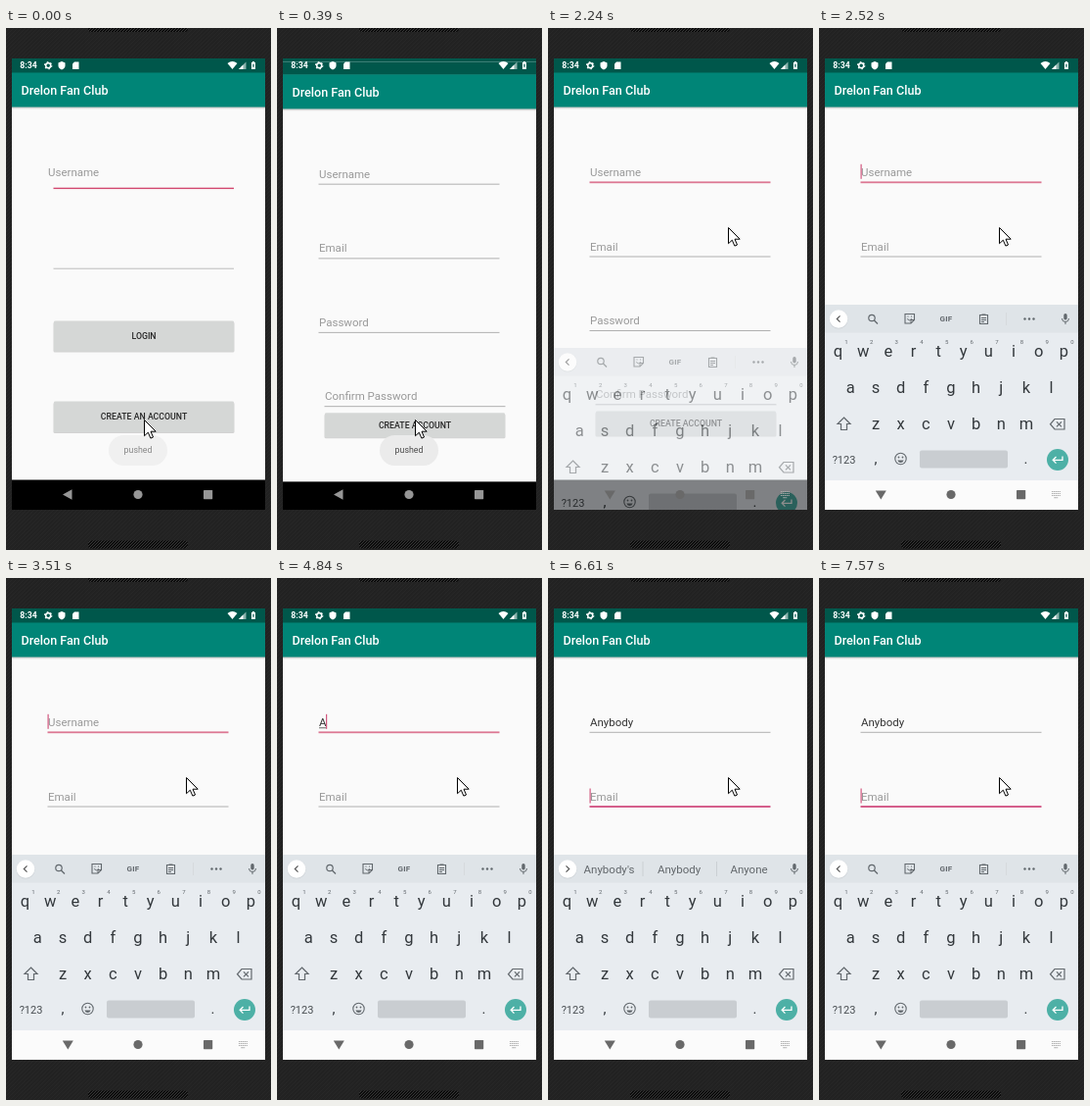
An HTML page for the animation above (8 s loop, 271 px wide and 532 px high).

```html
<!DOCTYPE html>
<html lang="en">
<head>
<meta charset="utf-8">
<title>Sign-up screen</title>
<style>
  html, body { margin: 0; width: 100%; height: 100%; overflow: hidden; background: #222; }
  svg { display: block; width: 100vw; height: 100vh; }
  text { font-family: Roboto, Arial, sans-serif; }
</style>
</head>
<body>
<svg id="stage" viewBox="0 0 271 532" xmlns="http://www.w3.org/2000/svg"></svg>
<script>
const LOOP = 8000;
const NAME = 'Anybody';
const stage = document.getElementById('stage');

// Screen recording: the picture is refreshed at these times and held between.
const ticks = [0, 150, 270, 390, 540, 690, 810, 960, 1120, 1260, 1540, 1690, 1820, 1970, 2090,
  2240, 2370, 2520, 2650, 3090, 3510, 4040, 4590, 4840, 4990, 5140, 5260, 5390, 5540, 5660,
  5780, 5930, 6180, 6610, 6890, 7010, 7570];
const caretFlips = [1540, 1970, 2520, 3090, 3510, 4040, 4590, 6180, 6610, 6890, 7570];
const keyTimes = [4840, 5140, 5260, 5390, 5540, 5660, 5780];
const suggestions = [
  [4990, 'A', 'All', 'And'],
  [5140, 'An', 'And', 'Any'],
  [5260, 'Any', 'Anyway', 'Anything'],
  [5390, 'Any', 'Anything', 'Anyone'],
  [5540, 'Any', 'Anything', 'Anybody'],
  [5930, "Anybody's", 'Anybody', 'Anyone']
];
const pointerPath = [[540, 141, 399], [690, 130, 320], [810, 122, 196], [960, 116, 175],
  [1120, 117, 157], [1260, 125, 153], [1540, 143, 185], [1690, 164, 196], [1820, 184, 203]];

const rect = (x, y, w, h, fill, more = '') =>
  `<rect x="${x}" y="${y}" width="${w}" height="${h}" fill="${fill}" ${more}/>`;
const text = (x, y, size, fill, str, more = '') =>
  `<text x="${x}" y="${y}" font-size="${size}" fill="${fill}" ${more}>${str}</text>`;
const mid = (x, y, size, fill, str, more = '') =>
  text(x, y, size, fill, str, 'text-anchor="middle" ' + more);
const path = (d, fill, more = '') => `<path d="${d}" fill="${fill}" ${more}/>`;
const line = (d, color, w = 1.1) => path(d, 'none', `stroke="${color}" stroke-width="${w}"`);
const group = (id, inner, more = '') => `<g id="${id}" ${more}>${inner}</g>`;

function windowFrame(inner) {
  return rect(6, 31, 259, 480, '#fafafa') +
    rect(6, 80, 259, 3, 'url(#shade)') +
    rect(6, 31, 259, 15, '#00574b') +
    rect(6, 45.5, 259, 35, '#008577') +
    text(15.5, 68, 12.6, '#fff', 'Drelon Fan Club', 'font-weight="500"') +
    inner + rect(6, 460.5, 259, 60, '#000');
}

function button(y, h, label) {
  return rect(48.5, y + 1, 185, h, '#000', 'rx="1.5" opacity=".16"') +
    rect(49, y, 184, h, '#d5d7d6', 'rx="1.2"') +
    mid(141, y + h / 2 + 3.1, 8.75, '#262626', label, 'font-weight="500"');
}

function field(id, x, y, hint) {
  return text(x, y, 11.5, '#999', hint, `id="${id}Hint"`) +
    rect(x - .5, y + 6, 185, 1, '#b1b1b1', `id="${id}Line"`);
}

function keyboard() {
  const ink = '#33383c', soft = '#62686d';
  const row = (keys, x0, y) => [...keys].map((k, i) => mid(x0 + i * 25.65, y, 16.5, ink, k)).join('');
  const digits = [...'1234567890'].map((k, i) => mid(28 + i * 25.65, 322, 6, soft, k)).join('');
  const tools =
    `<circle cx="54" cy="295.5" r="3.2" fill="none" stroke="${soft}" stroke-width="1.2"/>` +
    line('M56.4 298L60 301.5', soft, 1.3) +
    path('M88 291.5h9.500v6l-3.500 3.500h-6z', 'none', `stroke="${soft}" stroke-width="1.1"`) +
    line('M90.200 296.500q2.300 2.800 4.800 0M90.500 294h1M94 294h1M94 301v-3.500h3.500', soft, 1) +
    mid(130, 299.3, 8, soft, 'GIF', 'font-weight="700" letter-spacing=".3"') +
    path('M164.500 292.500h8v9h-8z', 'none', `stroke="${soft}" stroke-width="1.1"`) +
    line('M166.500 292h4M166 295.500h5M166 297.500h5M166 299.500h3', soft, 1) +
    line('M191.500 290v13', '#d3d7da', .8) +
    [210.5, 215, 219.5].map(x => `<circle cx="${x}" cy="296.500" r="1.200" fill="${soft}"/>`).join('');
  const words = line('M97 289v15M172.500 289v15', '#c4c9cd', .8) +
    [62.5, 134, 205.5].map((x, i) => mid(x, 300.5, 11.5, '#62676b', '', `id="word${i}"`)).join('');

  return rect(6, 282, 259, 180, '#e8ecf0') + rect(6, 282, 259, 28.5, '#dfe4e8') +
    rect(6, 461, 259, 80, '#fbfbfb') +
    '<circle cx="20" cy="297" r="9.500" fill="#b9bec3" opacity=".5"/>' +
    '<circle cx="20" cy="296.500" r="9.300" fill="#fff"/>' +
    group('chevron', line('M21.500 293.300L18.300 296.500L21.500 299.700', '#555', 1.2)) +
    group('tools', tools) + group('words', words) +
    rect(250.3, 291, 3.4, 6.5, soft, 'rx="1.700"') +
    line('M248.500 296q0 3.500 3.500 3.500t3.500-3.500M252 299.500v2.500', soft, 1) +
    row('qwertyuiop', 19.5, 334.5) + digits + row('asdfghjkl', 32.3, 371.5) + row('zxcvbnm', 58, 408.5) +
    path('M25.500 397l6.500 6.500h-3.500v6h-6v-6h-3.500z', 'none', `stroke="${soft}" stroke-width="1.200"`) +
    path('M241 398.500h10v10.500h-10l-4.500-5.250z', 'none', `stroke="${soft}" stroke-width="1.200"`) +
    line('M243 401.300l5 5M248 401.300l-5 5', soft, 1.2) +
    mid(25.5, 443.5, 11, '#484d51', '?123') + mid(58, 444, 15, ink, ',') + mid(211.5, 444, 15, ink, '.') +
    `<circle cx="83.500" cy="439" r="5.700" fill="none" stroke="${soft}" stroke-width="1.100"/>` +
    `<circle cx="81.500" cy="437.500" r=".9" fill="${soft}"/><circle cx="85.500" cy="437.500" r=".9" fill="${soft}"/>` +
    path('M80.300 440.500h6.400q-1 2.500-3.200 2.500t-3.200-2.500z', soft) +
    rect(103, 430.5, 90, 18, '#c9cdd1', 'rx="2"') +
    '<circle cx="244" cy="440" r="11" fill="#4db0a6"/>' +
    line('M249 436.500v3.800h-9.500M242.500 437l-3.300 3.300l3.300 3.300', '#fff', 1.3);
}

function statusIcons() {
  return text(14.3, 41.3, 8.7, '#fff', '8:34', 'font-weight="700"') +
    '<circle cx="43.200" cy="38.200" r="2.500" fill="none" stroke="#fff" stroke-width="1.500"/>' +
    '<circle cx="43.200" cy="38.200" r="3.600" fill="none" stroke="#fff" stroke-width="1.100" stroke-dasharray="1.600 2.170"/>' +
    path('M57 34l3.500 1.400v2.800q0 3-3.500 4.300q-3.500-1.300-3.500-4.300v-2.800z', '#fff') +
    path('M70 34.500h4.500v7.500h-6.500v-5.500z', '#fff') +
    path('M226.500 36q5-3.800 10 0l-5 6z', '#fff') +
    path('M245.500 34.500v7.500h-7.500z', '#fff', 'opacity=".55"') + path('M242.500 37.500v4.500h-4.500z', '#fff') +
    path('M251 35h1v-1h2v1h1v7h-4z', '#fff') + rect(252.4, 36.8, 1.2, 3, '#00574b');
}

function speaker(y, h) {
  return rect(84, y, 102, h, 'url(#mesh)', 'rx="3"');
}

stage.innerHTML = `
<defs>
  <clipPath id="screen"><rect x="6" y="31" width="259" height="460"/></clipPath>
  <clipPath id="reveal"><rect id="revealBox" x="6" y="31" width="259" height="500"/></clipPath>
  <linearGradient id="shade" x2="0" y2="1">
    <stop stop-color="#000" stop-opacity=".28"/><stop offset="1" stop-color="#000" stop-opacity="0"/>
  </linearGradient>
  <pattern id="grain" width="4" height="4" patternUnits="userSpaceOnUse">
    <rect width="4" height="4" fill="#222"/><path d="M0 4L4 0" stroke="#282828" stroke-width=".8"/>
  </pattern>
  <pattern id="mesh" width="3" height="3" patternUnits="userSpaceOnUse">
    <rect width="3" height="3" fill="#0b0b0b"/><path d="M0 3L3 0" stroke="#444" stroke-width=".8"/>
  </pattern>
</defs>` +
  rect(0, 0, 271, 532, 'url(#grain)') + speaker(-4, 8) + speaker(522.5, 8) +
  `<g clip-path="url(#screen)">` +
  group('login', windowFrame(
    rect(48.5, 162.7, 184.5, 1.4, '#d2476f') + rect(48.5, 244.7, 184.5, 1, '#bcbcbc') +
    button(298.5, 31, 'LOGIN') + button(380.5, 31.5, 'CREATE AN ACCOUNT'))) +
  `<g clip-path="url(#reveal)">` +
  group('signup', windowFrame(
    field('user', 43, 151, 'Username') + field('mail', 43, 226.5, 'Email') +
    field('pass', 43, 302, 'Password') + field('again', 49, 377.3, 'Confirm Password') +
    text(43, 151, 11.5, '#333', '', 'id="typed"') + rect(43, 152.4, 0, .8, '#444', 'id="compose"') +
    rect(42.5, 139, 1.2, 15, '#d2587f', 'id="caret"') +
    button(390.5, 25, 'CREATE ACCOUNT'))) + '</g>' +
  statusIcons() +
  group('toast', rect(105, 415, 60, 31, '#ebebeb', 'rx="15.500"') + mid(135, 433.3, 8.8, '#4c4c4c', 'pushed')) +
  group('keys', keyboard()) +
  group('nav',
    path('M58 475.500l9.500-5.200v10.400z', 'inherit', 'id="back"') +
    path('M57.800 471.500h11l-5.500 9z', 'inherit', 'id="hide"') +
    '<circle cx="135" cy="475.500" r="4.600"/>' + rect(202, 471, 9.2, 9.2, 'inherit', 'rx=".6"') +
    group('switcher', line('M238 472.500h9M238 474.500h9M238 476.500h9M240.500 478.700h4', '#aaa', '1.200" stroke-dasharray="1.300 .6'))) +
  '</g>' +
  group('pointer', path('M0 0V16.200L3.800 12.700L6.400 18.600L9 17.500L6.500 11.700H11.700Z', '#fff', 'stroke="#000" stroke-width="1"'));

const el = {};
stage.querySelectorAll('[id]').forEach(n => el[n.id] = n);

const clamp = v => Math.max(0, Math.min(1, v));
const count = (times, t) => times.filter(at => at <= t).length;
const set = (id, attrs) => { for (const k in attrs) el[id].setAttribute(k, attrs[k]); };
const show = (id, on) => set(id, { visibility: on ? 'visible' : 'hidden' });
const shift = (id, x, y) => set(id, { transform: `translate(${x} ${y})` });

function pointerAt(t) {
  const next = pointerPath.findIndex(p => p[0] > t);
  if (next === 0) return pointerPath[0].slice(1);
  if (next < 0) return pointerPath[pointerPath.length - 1].slice(1);
  const a = pointerPath[next - 1], b = pointerPath[next], k = (t - a[0]) / (b[0] - a[0]);
  return [a[1] + (b[1] - a[1]) * k, a[2] + (b[2] - a[2]) * k];
}

function underline(id, y, focus, color, h) {
  set(id, focus ? { y: y - h / 2, height: h, fill: color } : { y: y - .5, height: 1, fill: '#b1b1b1' });
}

function draw(t) {
  // New window rises while it is uncovered from the bottom.
  const decay = tau => Math.exp(-(t - 100) / tau);
  show('signup', t >= 150);
  if (t >= 150) {
    shift('signup', 0, t < 800 ? 19 * decay(125) : 0);
    set('revealBox', { y: 31 + 441 * decay(60) });
  }
  shift('login', 0, t >= 150 ? -9 * (1 - decay(125)) : 0);
  set('toast', { opacity: t < 600 ? clamp(.65 + t / 400) : clamp((1260 - t) / 660) });

  const onUser = t >= 1540 && t < 6610, onMail = t >= 6610;
  underline('userLine', 157.3, onUser, '#dc7793', 1.8);
  underline('mailLine', 233, onMail, '#d0457a', 1.7);

  const typed = NAME.slice(0, count(keyTimes, t));
  el.typed.textContent = typed;
  show('userHint', !typed);
  const w = typed ? el.typed.getComputedTextLength() : 0;
  set('compose', { width: onUser ? w : 0 });
  const typing = t >= 4840 && t < 6180;
  show('caret', typing || count(caretFlips, t) % 2 === 1);
  set('caret', { x: onMail ? 42.5 : 42.5 + w, y: onMail ? 214.5 : 138.8 });

  const p = clamp((t - 2100) / 420), open = clamp(p * 1.65);
  shift('keys', 0, 99 * (1 - p) ** 2);
  set('keys', { opacity: open });
  const hints = t < 6890 ? suggestions.filter(s => s[0] <= t).pop() : null;
  show('tools', !hints);
  show('words', !!hints);
  for (let i = 0; i < 3; i++) el['word' + i].textContent = hints ? hints[i + 1] : '';
  set('chevron', { transform: hints ? 'rotate(180 20 296.5)' : '' });

  show('back', t < 2090);
  show('hide', t >= 2090);
  show('switcher', t >= 2090);
  const gray = Math.round(150 - 45 * clamp(open * 1.8));
  set('nav', { fill: `rgb(${gray},${gray},${gray})` });

  shift('pointer', ...pointerAt(t).map(v => v + .5));
}

function frame() {
  const t = performance.now() % LOOP;
  draw(ticks[count(ticks, t) - 1]);
  requestAnimationFrame(frame);
}
frame();
</script>
</body>
</html>
```
